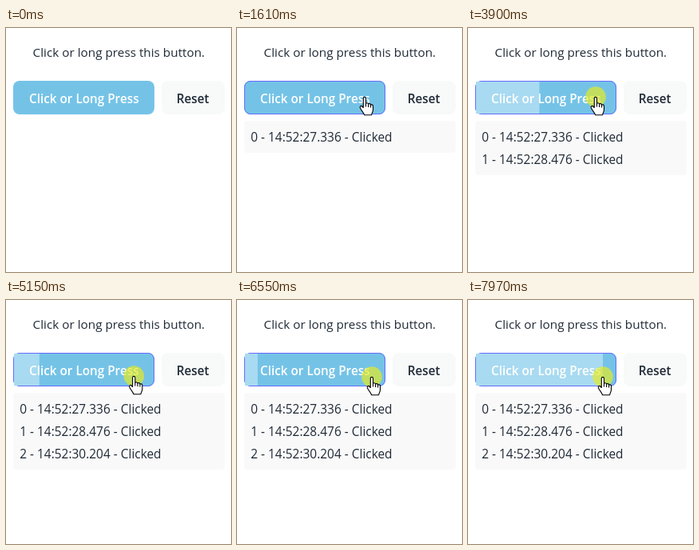
Write an HTML page that moves like this. It is 282 px wide and 305 px high and loops after 8 s.

```html
<!DOCTYPE html>
<html lang="en">
<head>
<meta charset="utf-8">
<title>Click or long press</title>
<style>
  html, body { margin: 0; width: 100%; height: 100%; overflow: hidden; background: #fff; }
  svg { display: block; }
  text { font: 15.3px "Open Sans", "Noto Sans", sans-serif; fill: #1f2a36; }
  .label { font-weight: 600; text-anchor: middle; }
  .row { font-size: 15.45px; }
  .cursor path { fill: #fff; stroke: #000; stroke-width: 1.1; stroke-linejoin: round; }
  .cursor .line { fill: none; }
</style>
</head>
<body>
<svg width="282" height="305" viewBox="0 0 282 305">
  <text x="33.5" y="36">Click or long press this button.</text>

  <rect x="9" y="66" width="177" height="42" rx="8" fill="#74c3e7"/>
  <rect id="border" x="9.5" y="66.5" width="176" height="41" rx="7.5" fill="none" stroke="#646cff"/>
  <rect id="bar" x="10" y="67" height="40" fill="#a8daf1"/>
  <text class="label" x="97.8" y="94" style="fill:#fff">Click or Long Press</text>

  <rect x="195" y="66" width="79" height="42" rx="8" fill="#f8f9f9"/>
  <text class="label" x="234.2" y="94">Reset</text>

  <rect id="panel" x="9" y="116" width="265" rx="4" fill="#f9f9f9"/>
  <g id="rows"></g>

  <g id="pointer">
    <circle id="press" r="12.8" fill="#e6ea20" fill-opacity=".68"/>
    <g class="cursor" id="hand" transform="translate(0 1)">
      <path d="M-1.7 12.5V1C-1.7-1.2 1.5-1.2 1.5 1V7.6C2 6.2 4.5 6.4 4.6 8.4C5.2 7 7.6 7.4 7.6 9.4C8.3 8.3 10.5 8.6 10.5 10.8V15C10.5 18 9 19 8.6 21.7H-.5C-1 19-3.6 17-5.6 13C-6.4 11.2-4.5 9.6-3.1 11Z"/>
      <path class="line" d="M1.5 7.6V11.5M4.6 8.4V12M7.6 9.4V12.5"/>
    </g>
    <g class="cursor" id="beam">
      <path class="line" d="M-3-7.5H-1L0-7L1-7.5H3M0-7V7M-3 7.5H-1L0 7L1 7.5H3"/>
    </g>
    <g class="cursor" id="arrow">
      <path d="M.5.5V16.5L4.2 13L6.6 18.4L9 17.3L6.6 12.1H11.8Z"/>
    </g>
  </g>
</svg>
<script>
const LOOP = 8000;
const STEP = 79;        // ms between bar refreshes
const STEP_WIDTH = 7.95;
const HOLD_DELAY = 215; // ms of pressing before the bar starts

const easeIn = f => f ** 3;
const easeOut = f => 1 - (1 - f) ** 2;

const moves = [
  { from: 50, to: 840, x: 102, y: 92, ease: easeOut },
  { from: 1280, to: 1610, x: 160, y: 86, ease: easeOut },
  { from: 4750, to: 5570, x: 163, y: 163, ease: easeIn },
  { from: 5570, to: 6170, x: 169, y: 96, ease: easeOut }
];

// A press without a time stamp does not count as a click
const presses = [
  { down: 980, up: 1140, stamp: "14:52:27.336" },
  { down: 2070, up: 2220, stamp: "14:52:28.476" },
  { down: 2885, up: 3970, stamp: "14:52:30.204" },
  { down: 4580, up: 5610 },
  { down: 6170, up: LOOP }
];
const clicks = presses.filter(p => p.stamp);

const el = id => document.getElementById(id);
const show = (node, on) => node.setAttribute("visibility", on ? "visible" : "hidden");

const rows = clicks.map(({ stamp }, i) => {
  const row = document.createElementNS("http://www.w3.org/2000/svg", "text");
  row.setAttribute("class", "row");
  row.setAttribute("x", 17.2);
  row.setAttribute("y", 142 + 28 * i);
  row.textContent = `${i} - ${stamp} - Clicked`;
  el("rows").append(row);
  return row;
});

function pointerAt(t) {
  let x = 300, y = 325;
  for (const m of moves) {
    const f = m.ease(Math.min(1, Math.max(0, (t - m.from) / (m.to - m.from))));
    x += (m.x - x) * f;
    y += (m.y - y) * f;
  }
  return [x, y];
}

function barWidth(press, t) {
  const held = t - press.down - HOLD_DELAY;
  return Math.max(0, Math.floor(held / STEP)) * STEP_WIDTH;
}

function draw(t) {
  const [x, y] = pointerAt(t);
  const press = presses.find(p => t >= p.down && t < p.up);
  const count = clicks.filter(c => t >= c.up).length;
  const panelHeight = count && 28 * count + 12;
  const over = x >= 9 && x < 186 && y >= 66 && y < 108;
  const onText = x < 196 && y > 116 && y < 116 + panelHeight;

  el("pointer").setAttribute("transform", `translate(${x} ${y})`);
  show(el("hand"), over);
  show(el("beam"), onText);
  show(el("arrow"), !over && !onText);
  show(el("press"), press);
  show(el("border"), over);
  el("bar").setAttribute("width", press && over ? barWidth(press, t) : 0);
  el("panel").setAttribute("height", panelHeight);
  rows.forEach((row, i) => show(row, i < count));
}

function tick() {
  draw(performance.now() % LOOP);
  requestAnimationFrame(tick);
}
tick();
</script>
</body>
</html>
```
